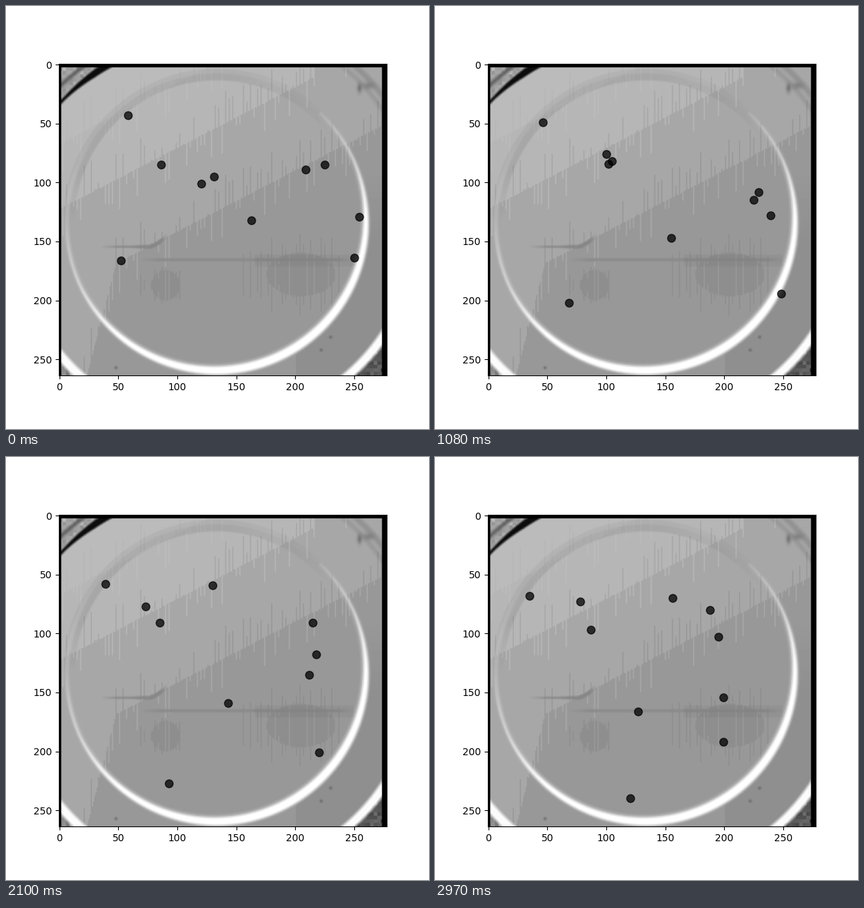
Recreate the animation shown at these times as a matplotlib script. Size 600 px wide and 600 px high, loop 3 s.

```python
import numpy as np
import matplotlib.pyplot as plt
from matplotlib.animation import FuncAnimation

H, W = 264, 278
FRAMES = 100

# Each colony drifts through a few points, evenly spaced in time
PATHS = [
    [(58, 43), (43, 52), (35, 68)],
    [(86, 85), (95, 86), (116, 74), (133, 57), (156, 70)],
    [(120, 101), (106, 94), (93, 75), (70, 80), (87, 97)],
    [(131, 95), (116, 81), (96, 78), (81, 91), (94, 83), (78, 73)],
    [(209, 89), (225, 113), (214, 133), (199, 154)],
    [(225, 85), (228, 106), (227, 104), (211, 88), (188, 80)],
    [(254, 129), (231, 125), (195, 103)],
    [(250, 164), (250, 192), (224, 201), (199, 192)],
    [(163, 132), (151, 152), (127, 166)],
    [(52, 166), (77, 213), (120, 240)],
]


def position(path, u):
    """Polynomial through the points of a path, snapped to whole units."""
    knots = np.linspace(0, 1, len(path))
    total = np.zeros(2)
    for i, point in enumerate(path):
        others = np.delete(knots, i)
        total += np.prod((u - others) / (knots[i] - others)) * np.array(point)
    return np.rint(total)


def band(d, center, half, soft=1.5):
    return np.clip((half - np.abs(d - center)) / soft + 0.5, 0, 1)


def blob(x, y, cx, cy, rx, ry):
    return np.exp(-((x - cx) / rx) ** 2 - ((y - cy) / ry) ** 2)


def ramp(v, lo, hi):
    return np.clip((v - lo) / (hi - lo), 0, 1)


def mix(img, value, alpha):
    return img + (value - img) * alpha


def agar(x, y, r, rng):
    """Stepped light falling off to the lower right, with combed edges."""
    comb = 26 * rng.uniform(-1, 1, W) * (np.arange(W) % 3 == 0)
    t = 0.46 * x + 0.89 * y + comb
    shifted = t - 3 * np.clip(48 - x, 0, None) * ramp(y, 130, 170)
    t = np.maximum(np.minimum(t, 120), shifted)
    img = 182.0 - 15 * (t + 12 * (x > 215) > 109) - 15 * (t > 172) + 5 * (t < 60)

    shade = blob(x, y, 90, 187, 18, 20) + blob(x, y, 205, 178, 45, 28)
    img -= 10 * (shade > 0.65 - comb / 50) * (shade > 0.2)
    img -= 9 * (r > 130) * (x > 200) * ramp(y, 90, 150)

    img = mix(img, 138, 0.9 * band(y, 165.5, 1.3) * ramp(x, 68, 85) * ramp(-x, -250, -235))
    img -= 6 * band(y, 166, 5) * (x > 165) * (x < 250)
    hook = 154.5 - 10 * ramp(x, 76, 92) ** 1.5
    return mix(img, 132, 0.85 * band(y, hook, 0.9 + 1.2 * ramp(x, 60, 84))
               * ramp(x, 34, 50) * ramp(-x, -92, -86))


def rim(img, r, ang):
    """Dim along the top, bright and thickest at the lower right."""
    top = ramp(ang, -180, -160) * ramp(-ang, 35, 85)
    img = img - top * (15 * band(r, 123.5, 3) + 8 * band(r, 128.5, 2))
    img = mix(img, 190, 0.5 * ramp(np.abs(ang), 145, 165) * band(r, 127, 1.8))

    s = np.cos(np.radians(ang - 65))
    half = 0.8 + 2.6 * np.clip(s, 0, 1)
    glow = ramp(s, -0.45, 0.4) * ((ang > -47) | (ang < -150))
    img = mix(img, 200, 0.7 * glow * band(r, 128 - half, half + 1.5, 3))
    return mix(img, 255, glow * band(r, 128.4 - half, half, 2.5))


def wall(img, x, y, r, rng):
    """Outer dish wall, seen only in the four corners."""
    grain = rng.normal(0, 1, (H // 3, W // 3 + 1)).repeat(3, 0).repeat(3, 1)[:, :W]
    low = y > 180
    edge = 171 + 3 * (x < 140)
    beyond = np.where(x > 140, 85, 135) + 15 * grain
    img = np.where(low & (r > edge), beyond, img)
    img = np.where(low, mix(img, 252, band(r, edge, 3.8, 3)), img)

    corner = (x > 200) & (y < 60)
    img = img - corner * (14 * band(r, 170, 2, 3) + 20 * band(r, 177, 2.5, 3))
    img = mix(img, 95, 0.7 * blob(x, y, 254.5, 20, 2, 4))
    img = mix(img, 110, 0.6 * blob(x, y, 262, 18, 5, 3))

    q = np.hypot(x - 119, y - 141.7)
    near = (x < 70) & (y < 60)
    img = np.where(near & (q > 163), 160 + 10 * grain, img)
    img = np.where(near, mix(img, 12, band(q, 161, 1.3 + 1.6 * ramp(x, 5, 30), 2)), img)
    return np.where(near, mix(img, 95, band(q, 171, 1.5, 3)), img)


def dish():
    rng = np.random.default_rng(4)
    y, x = np.mgrid[0:H, 0:W].astype(float)
    r = np.hypot(x - 133.4, y - 134)
    ang = np.degrees(np.arctan2(y - 134, x - 133.4))

    img = agar(x, y, r, rng)
    img = rim(img, r, ang)
    img = wall(img, x, y, r, rng)
    for cx, cy in ((222, 242), (230, 231), (48, 257)):
        img = mix(img, 90, 0.7 * blob(x, y, cx, cy, 1.3, 1.3))

    img = np.clip(img, 0, 255)
    img[:3] = 0
    img[:, :2] = 0
    img[:, 274:] = 0
    return img


fig, ax = plt.subplots(figsize=(6, 6), dpi=100)
ax.imshow(dish(), cmap="gray", vmin=0, vmax=255)
dots = [ax.plot([], [], "o", ms=8, color="black", alpha=0.75)[0] for _ in PATHS]
ax.set_xlim(-0.5, W - 0.5)
ax.set_ylim(H - 0.5, -0.5)


def update(i):
    for dot, path in zip(dots, PATHS):
        px, py = position(path, i / (FRAMES - 1))
        dot.set_data([px], [py])
    return dots


anim = FuncAnimation(fig, update, frames=FRAMES, interval=30,
                     repeat=True, repeat_delay=0)
plt.show()
```
